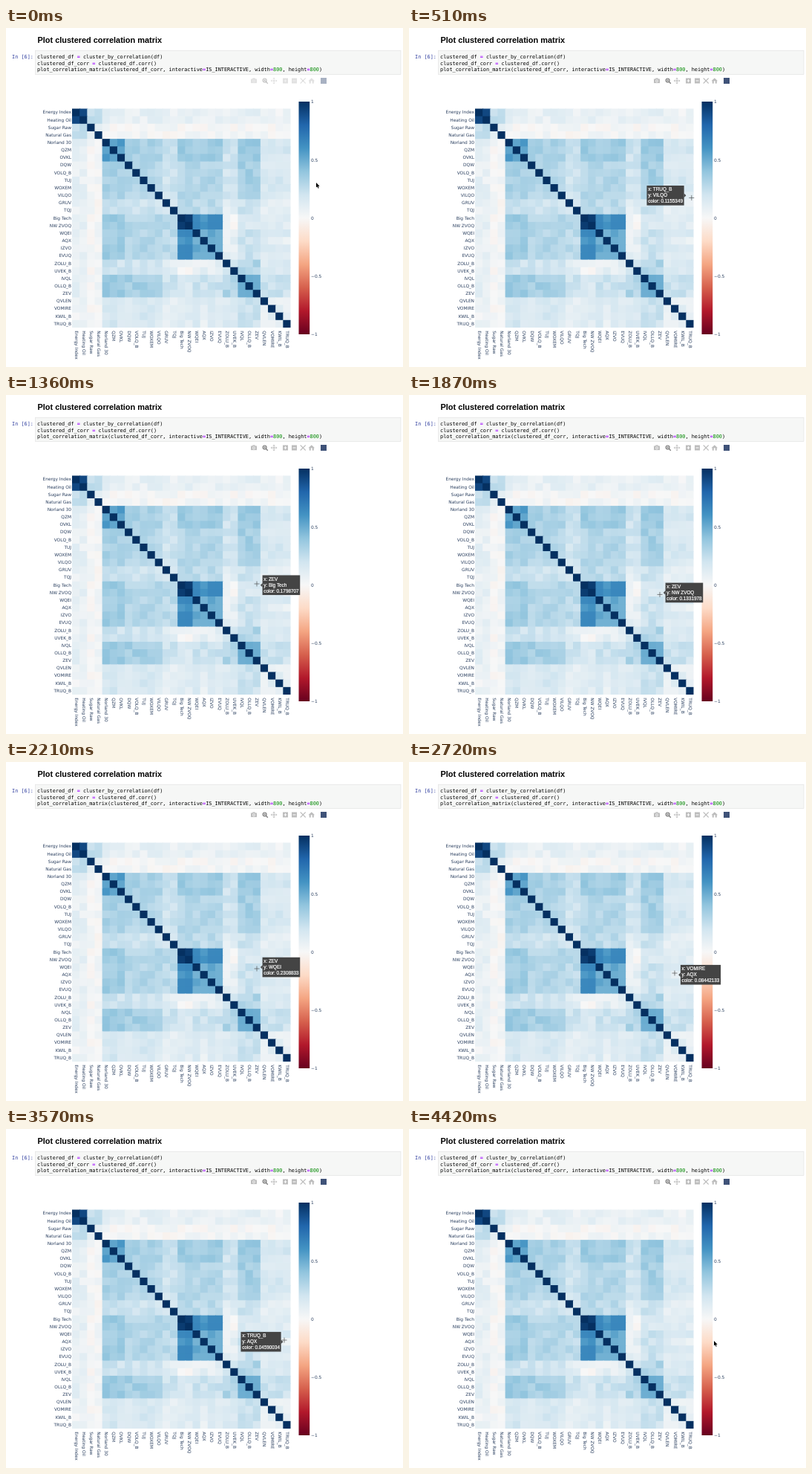
Recreate the animation shown at these times as an HTML page with a canvas. Size 535 by 456 pixels, loop 4590 ms.

```html
<!DOCTYPE html>
<html lang="en">
<head>
<meta charset="utf-8">
<title>Clustered correlation matrix</title>
<style>
html, body { margin: 0; width: 100%; height: 100%; overflow: hidden; background: #fff; }
canvas { display: block; width: 535px; height: 456px; }
</style>
</head>
<body>
<canvas id="stage"></canvas>
<script>
const W = 535, H = 456, STEP = 170, STEPS = 27;
const MONO = '"DejaVu Sans Mono", monospace';
const SANS = '"DejaVu Sans", sans-serif';
const ARIAL = '"Liberation Sans", Arial, sans-serif';
const canvas = document.getElementById('stage');
const ctx = canvas.getContext('2d');
const dpr = window.devicePixelRatio || 1;
canvas.width = W * dpr;
canvas.height = H * dpr;
ctx.scale(dpr, dpr);

// Each cluster loads on shared factors; bond is the extra tie inside it.
const clusters = [
  { names: 'Energy Index,Heating Oil', energy: .97, market: .15 },
  { names: 'Sugar Raw,Natural Gas', energy: .23, market: .03 },
  { names: 'Norland 30,QZM,OVKL', market: .6, region: .05, bond: .2 },
  { names: 'DQW,VOLQ_B,TUJ,WOXEM,VILQO', market: .54 },
  { names: 'GRUV,TQJ', market: .38, region: .12 },
  { names: 'Big Tech,NW ZVOQ', market: .55, region: .7, bond: .18 },
  { names: 'WQEI,AQX,IZVO,EVUQ', market: .55, region: .45 },
  { names: 'ZOLU_B,UVEK_B', market: .36, region: -.25 },
  { names: 'IVQL,OLLQ_B,ZEV', market: .63, region: -.3 },
  { names: 'QVLEN,VOMIRE,KWIL_B,TRUQ_B', market: .3, region: -.08 }
];
const assets = clusters.flatMap(cluster => cluster.names.split(',').map(name => ({ name, cluster })));
const N = assets.length;
const grid = { x: 89, y: 108.5, cell: 294.5 / N };

let seed = 41;
const random = () => (seed = (seed * 16807) % 2147483647) / 2147483647;
const corr = assets.map(() => Array(N).fill(1));
const setPair = (i, j, v) => { corr[i][j] = corr[j][i] = v; };

function clusterLevel(a, b) {
  const shared = f => (a[f] || 0) * (b[f] || 0);
  return shared('energy') + shared('market') + shared('region') + (a === b && a.bond || 0);
}
for (let i = 0; i < N; i++) {
  for (let j = 0; j < i; j++) {
    const noise = (random() - .5) * .1;
    setPair(i, j, Math.min(.97, clusterLevel(assets[i].cluster, assets[j].cluster) + noise));
  }
}

// Where the pointer goes, with the reading it meets there.
const stops = [
  { step: 0, x: 418, y: 208 },
  { step: 5, x: 356, y: 242, value: .1126543 },
  { step: 8, x: 338, y: 254, value: .1798707 },
  { step: 13, x: 338, y: 278, value: .2308833 },
  { step: 16, x: 358, y: 284, value: .08442133 },
  { step: 21, x: 375, y: 284, value: .04590034 },
  { step: 22, x: 375, y: 284 },
  { step: 26, x: 411, y: 285 }
];
const cellAt = ({ x, y }) => [x - grid.x, y - grid.y].map(d => Math.floor(d / grid.cell));
stops.filter(s => s.value).forEach(s => setPair(...cellAt(s), s.value));

// Diverging scale from -1 to 1.
const scale = ['67001f', 'b2182b', 'd6604d', 'f4a582', 'fddbc7', 'f7f7f7',
  'd1e5f0', '92c5de', '4393c3', '2166ac', '053061'];
const rgb = scale.map(h => [0, 2, 4].map(k => parseInt(h.slice(k, k + 2), 16)));
function colorAt(v) {
  const p = (v + 1) * 5, k = Math.min(9, Math.floor(p));
  return `rgb(${rgb[k].map((c, n) => Math.round(c + (rgb[k + 1][n] - c) * (p - k)))})`;
}

function text(str, x, y, color, font, align = 'left', baseline = 'alphabetic') {
  ctx.fillStyle = color;
  ctx.font = font;
  ctx.textAlign = align;
  ctx.textBaseline = baseline;
  ctx.fillText(str, x, y);
}
function rect(x, y, w, h, color) {
  ctx.fillStyle = color;
  ctx.fillRect(x, y, w, h);
}
function line(color, width, ...points) {
  ctx.strokeStyle = color;
  ctx.lineWidth = width;
  ctx.beginPath();
  points.forEach(p => ctx.lineTo(...p));
  ctx.stroke();
}
function plus(x, y, r, color, width) {
  line(color, width, [x - r, y], [x + r, y]);
  line(color, width, [x, y - r], [x, y + r]);
}
function ring(x, y, r, color, width) {
  ctx.strokeStyle = color;
  ctx.lineWidth = width;
  ctx.beginPath();
  ctx.arc(x, y, r, 0, Math.PI * 2);
  ctx.stroke();
}
function polygon(color, ...points) {
  ctx.fillStyle = color;
  ctx.beginPath();
  points.forEach(p => ctx.lineTo(...p));
  ctx.closePath();
  ctx.fill();
}

function codeLine(str, y) {
  const size = 6.86, advance = size * .60205;
  let x = 42;
  for (const part of str.split(/(=|\b800\b)/)) {
    const op = part === '=', num = part === '800';
    text(part, x, y, op ? '#aa22ff' : num ? '#008800' : '#000', `${op ? 'bold ' : ''}${size}px ${MONO}`);
    x += part.length * advance;
  }
}

function drawNotebook() {
  text('Plot clustered correlation matrix', 42.5, 20, '#000', `bold 10.93px ${ARIAL}`);
  text('In [6]:', 8, 41.2, '#303f9f', `6.86px ${MONO}`);
  rect(39.5, 30.5, 492.5, 32, '#f6f7f6');
  ctx.strokeStyle = '#e0e0e0';
  ctx.lineWidth = .6;
  ctx.strokeRect(39.5, 30.5, 492.5, 32);
  codeLine('clustered_df = cluster_by_correlation(df)', 41.2);
  codeLine('clustered_df_corr = clustered_df.corr()', 49.5);
  codeLine('plot_correlation_matrix(clustered_df_corr, interactive=IS_INTERACTIVE, width=800, height=800)', 57.8);
}

function drawToolbar(alpha) {
  const soft = '#bdbdbd', active = '#7a7a7a', y = 71;
  ctx.save();
  ctx.globalAlpha = alpha;
  // Camera
  rect(330, 68.5, 8, 5.6, soft);
  rect(332.2, 67.4, 3.6, 1.4, soft);
  ring(334, 71.3, 1.5, '#fff', .8);
  // Magnifier
  ring(348.6, 70.4, 2.4, active, 1.2);
  line(active, 1.3, [350.3, 72.2], [352.8, 74.8]);
  plus(348.6, 70.4, 1.3, active, .8);
  // Pan
  plus(361.1, y, 3.8, soft, 1);
  for (const s of [-1, 1]) {
    line(soft, .8, [359.8, y + s * 2.7], [361.1, y + s * 4], [362.4, y + s * 2.7]);
    line(soft, .8, [361.1 + s * 2.7, y - 1.3], [361.1 + s * 4, y], [361.1 + s * 2.7, y + 1.3]);
  }
  // Zoom in and out
  for (const x of [376.5, 388.5]) rect(x - 3.5, y - 3.5, 7, 7, soft);
  plus(376.5, y, 2, '#fff', 1);
  line('#fff', 1, [386.5, y], [390.5, y]);
  // Autoscale
  for (const s of [-1, 1]) line(soft, 1.1, [396.7, y - s * 3.5], [403.7, y + s * 3.5]);
  // Home
  polygon(soft, [407.5, 71.2], [411.8, 67.2], [416, 71.2]);
  rect(408.7, 71, 2.1, 3.6, soft);
  rect(412.7, 71, 2.1, 3.6, soft);
  rect(424, 67, 8, 8, '#3f5278');
  ctx.restore();
}

function drawMatrix() {
  const ink = '#2a3f5f', font = `5.86px ${SANS}`;
  // Cells run slightly under their next neighbours so that no seams show.
  const span = k => grid.cell + (k < N - 1 ? 1 : 0);
  corr.forEach((row, r) => {
    row.forEach((v, c) =>
      rect(grid.x + c * grid.cell, grid.y + r * grid.cell, span(c), span(r), colorAt(v)));
    const mid = (r + .5) * grid.cell;
    text(assets[r].name, 88, grid.y + mid + .3, ink, font, 'right', 'middle');
    ctx.save();
    ctx.translate(grid.x + mid, 407.3);
    ctx.rotate(Math.PI / 2);
    text(assets[r].name, 0, 0, ink, font, 'left', 'middle');
    ctx.restore();
  });
  const fill = ctx.createLinearGradient(0, 412, 0, 99);
  scale.forEach((c, k) => fill.addColorStop(k / 10, '#' + c));
  rect(394.5, 99, 14.7, 313, fill);
  ['1', '0.5', '0', '\u22120.5', '\u22121'].forEach((s, k) =>
    text(s, 411, 99.8 + k * 78.25, ink, font, 'left', 'middle'));
}

function drawTooltip(col, row) {
  const lines = ['x: ' + assets[col].name, 'y: ' + assets[row].name, 'color: ' + corr[row][col].toPrecision(7)];
  const font = `6.35px ${ARIAL}`;
  ctx.font = font;
  const w = Math.max(...lines.map(s => ctx.measureText(s).width)) + 3.4, h = 26.6;
  const right = grid.x + (col + 1) * grid.cell, y = grid.y + (row + .5) * grid.cell;
  const flip = right + 3 + w > 433;
  const tip = flip ? right - grid.cell : right;
  const x = flip ? tip - 2.7 - w : tip + 2.7;
  const side = flip ? x + w : x;
  rect(x, y - h / 2, w, h, '#444');
  polygon('#444', [tip, y], [side, y - 2.8], [side, y + 2.8]);
  ctx.strokeStyle = '#fff';
  ctx.lineWidth = .2;
  lines.forEach((s, k) => {
    const top = y + (k - 1) * 8.2 + .2;
    text(s, x + 1.7, top, '#fff', font, 'left', 'middle');
    ctx.strokeText(s, x + 1.7, top);
  });
}

function pointerAt(step) {
  const k = Math.max(1, stops.findIndex(s => s.step >= step));
  const a = stops[k - 1], b = stops[k];
  const u = (step - a.step) / (b.step - a.step);
  return { x: a.x + (b.x - a.x) * u, y: a.y + (b.y - a.y) * u };
}

function drawPointer(pos) {
  const [col, row] = cellAt(pos), { x, y } = pos;
  if (col < N) {
    drawTooltip(col, row);
    plus(x, y, 3.5, '#444', .65);
    return;
  }
  const arrow = [[0, 0], [0, 6.6], [1.5, 5.3], [2.6, 7.7], [3.7, 7.2], [2.6, 4.9], [4.6, 4.8]]
    .map(([dx, dy]) => [x + dx, y + dy]);
  line('#fff', 1, ...arrow, arrow[0]);
  polygon('#000', ...arrow);
}

let shown = -1;
function frame(now) {
  const step = Math.floor(now / STEP) % STEPS;
  if (step !== shown) {
    shown = step;
    rect(0, 0, W, H, '#fff');
    drawNotebook();
    drawToolbar(step ? 1 : .45);
    drawMatrix();
    drawPointer(pointerAt(step));
  }
  requestAnimationFrame(frame);
}
frame(0);
</script>
</body>
</html>
```
